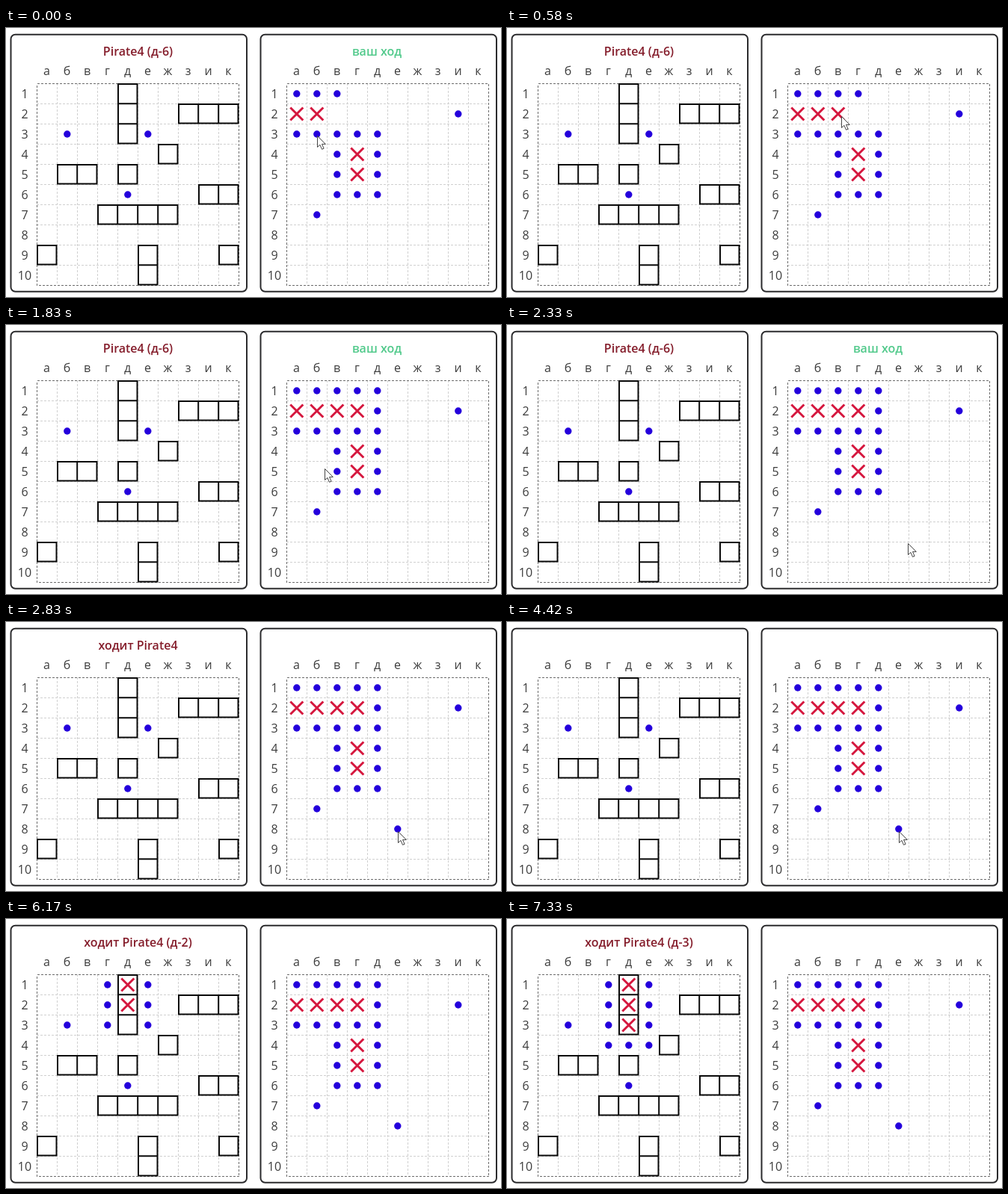
Write an HTML page that moves like this. It is 662x360 px and loops after 8000 ms.

```html
<!DOCTYPE html>
<html lang="ru">
<head>
<meta charset="utf-8">
<title>Морской бой</title>
<style>
  html, body { margin: 0; width: 100%; height: 100%; overflow: hidden; background: #fff; }
  svg { display: block; width: 662px; height: 360px; }
  text { font: 16px "Open Sans", "Noto Sans", sans-serif; fill: #3c3c3c; text-anchor: middle; }
  .title { font-weight: 600; }
  .panel { fill: #fff; stroke: #2b2b2d; stroke-width: 2; }
  .grid { fill: none; stroke: #d0d0d0; stroke-dasharray: 3 2; shape-rendering: crispEdges; }
  .frame { fill: none; stroke: #6c6c6c; stroke-dasharray: 3 2; shape-rendering: crispEdges; }
  .ship { fill: none; stroke: #0a0a0a; stroke-width: 2; }
  .miss { fill: #2400dc; }
  .hit { fill: none; stroke: #d5173e; stroke-width: 3; }
  .cursor { fill: #fff; stroke: #444; stroke-width: 1; }
</style>
</head>
<body>
<svg id="stage" viewBox="0 0 662 360"></svg>
<script>
const LOOP = 8000, CELL = 27, TOP = 74, SIZE = CELL * 10;
const COLUMNS = "абвгдежзик";
const RIVAL = "Pirate4";
const LEFT = 41, RIGHT = 375;
const stage = document.getElementById("stage");
const timed = [];

function add(tag, attrs, text = "") {
  const node = document.createElementNS("http://www.w3.org/2000/svg", tag);
  for (const key in attrs) node.setAttribute(key, attrs[key]);
  node.textContent = text;
  return stage.appendChild(node);
}

const label = (x, y, text) => add("text", { x, y }, text);
const show = (node, on) => node.setAttribute("visibility", on ? "visible" : "hidden");

// Top left corner of a cell such as "г10".
const corner = (left, name) => [
  left + COLUMNS.indexOf(name[0]) * CELL,
  TOP + (name.slice(1) - 1) * CELL
];

function board(left) {
  add("rect", { class: "panel", x: left - 34.5, y: 8.8, width: 315.5, height: 344, rx: 6 });
  let lines = "";
  for (let i = 0; i < 10; i++) {
    const offset = i * CELL;
    if (i) lines += `M${left + offset + .5} ${TOP}v${SIZE}M${left} ${TOP + offset + .5}h${SIZE}`;
    label(left + offset + 13.5, 63, COLUMNS[i]);
    label(left - 16, TOP + offset + 20, i + 1);
  }
  add("path", { class: "grid", d: lines });
  add("rect", { class: "frame", x: left + .5, y: TOP + .5, width: SIZE, height: SIZE });
}

function ship(name, length, vertical) {
  const [x, y] = corner(LEFT, name);
  const long = length * CELL - 1.5, short = CELL - 1.5;
  let d = `M${x + 1} ${y + 1}` +
    (vertical ? `h${short}v${long}h-${short}z` : `h${long}v${short}h-${long}z`);
  for (let i = 1; i < length; i++) {
    d += vertical ? `M${x + 1} ${y + i * CELL + .2}h${short}` : `M${x + i * CELL + .2} ${y + 1}v${short}`;
  }
  add("path", { class: "ship", d });
}

function marks(left, at, hits, misses) {
  const each = (names, draw) => names.split(" ").filter(Boolean).forEach(name => {
    const [x, y] = corner(left, name);
    timed.push({ at, node: draw(x + 13.8, y + 14) });
  });
  each(misses, (cx, cy) => add("circle", { class: "miss", cx, cy, r: 4.7 }));
  each(hits, (x, y) => add("path", { class: "hit", d: `M${x - 8.5} ${y - 8.5}l17 17m0 -17l-17 17` }));
}

board(LEFT);
board(RIGHT);

ship("д1", 3, true);
ship("е9", 2, true);
ship("г7", 4);
ship("з2", 3);
ship("б5", 2);
ship("и6", 2);
["ж4", "д5", "а9", "к9"].forEach(name => ship(name, 1));

marks(LEFT, 0, "", "б3 е3 д6");
marks(LEFT, 5250, "д1", "г2 е2");
marks(LEFT, 6170, "д2", "г1 е1 г3");
marks(LEFT, 7330, "д3", "г4 д4 е4");

marks(RIGHT, 0, "а2 б2 г4 г5",
  "а1 б1 в1 а3 б3 в3 г3 д3 в4 д4 в5 д5 в6 г6 д6 б7 и2");
marks(RIGHT, 500, "в2", "г1");
marks(RIGHT, 1170, "г2", "д1 д2");
marks(RIGHT, 2830, "", "е8");

const rivalTitle = add("text", { class: "title", x: 176.5, y: 37, style: "fill:#841c2a" });
const ownTitle = add("text", { class: "title", x: 496, y: 37, style: "fill:#50c98a" }, "ваш ход");
const cursor = add("path", { class: "cursor", d: "M0 0v15l3.4 -3.2 2.6 6 2.6 -1.1 -2.6 -5.8h4.8z" });

const titles = [
  [0, `${RIVAL} (д-6)`],
  [2830, `ходит ${RIVAL}`],
  [5250, `ходит ${RIVAL} (д-1)`],
  [6170, `ходит ${RIVAL} (д-2)`],
  [7330, `ходит ${RIVAL} (д-3)`]
];

// Cursor stops: time, x, y.
const path = [
  [0, 416, 144], [330, 441, 117], [500, 442, 117], [920, 466, 122], [1420, 466, 122],
  [1830, 426, 192], [2090, 462, 242], [2330, 536, 292], [2580, 524, 280], [LOOP, 524, 280]
];

function cursorAt(t) {
  const i = path.findIndex(stop => stop[0] > t);
  const [t0, x0, y0] = path[i - 1], [t1, x1, y1] = path[i];
  const k = (t - t0) / (t1 - t0);
  return [x0 + (x1 - x0) * k, y0 + (y1 - y0) * k].map(Math.round);
}

function render(now) {
  const t = now % LOOP;
  const phase = t % 2000;
  const lit = phase < 420 || phase >= 830;
  const ownTurn = t < 2830;
  timed.forEach(mark => show(mark.node, t >= mark.at));
  rivalTitle.textContent = titles.filter(([at]) => t >= at).pop()[1];
  show(rivalTitle, ownTurn || lit);
  show(ownTitle, ownTurn && lit);
  cursor.setAttribute("transform", `translate(${cursorAt(t).map(v => v + .5)})`);
  show(cursor, t < 4750);
}

function tick() {
  render(performance.now());
  requestAnimationFrame(tick);
}
tick();
</script>
</body>
</html>
```
